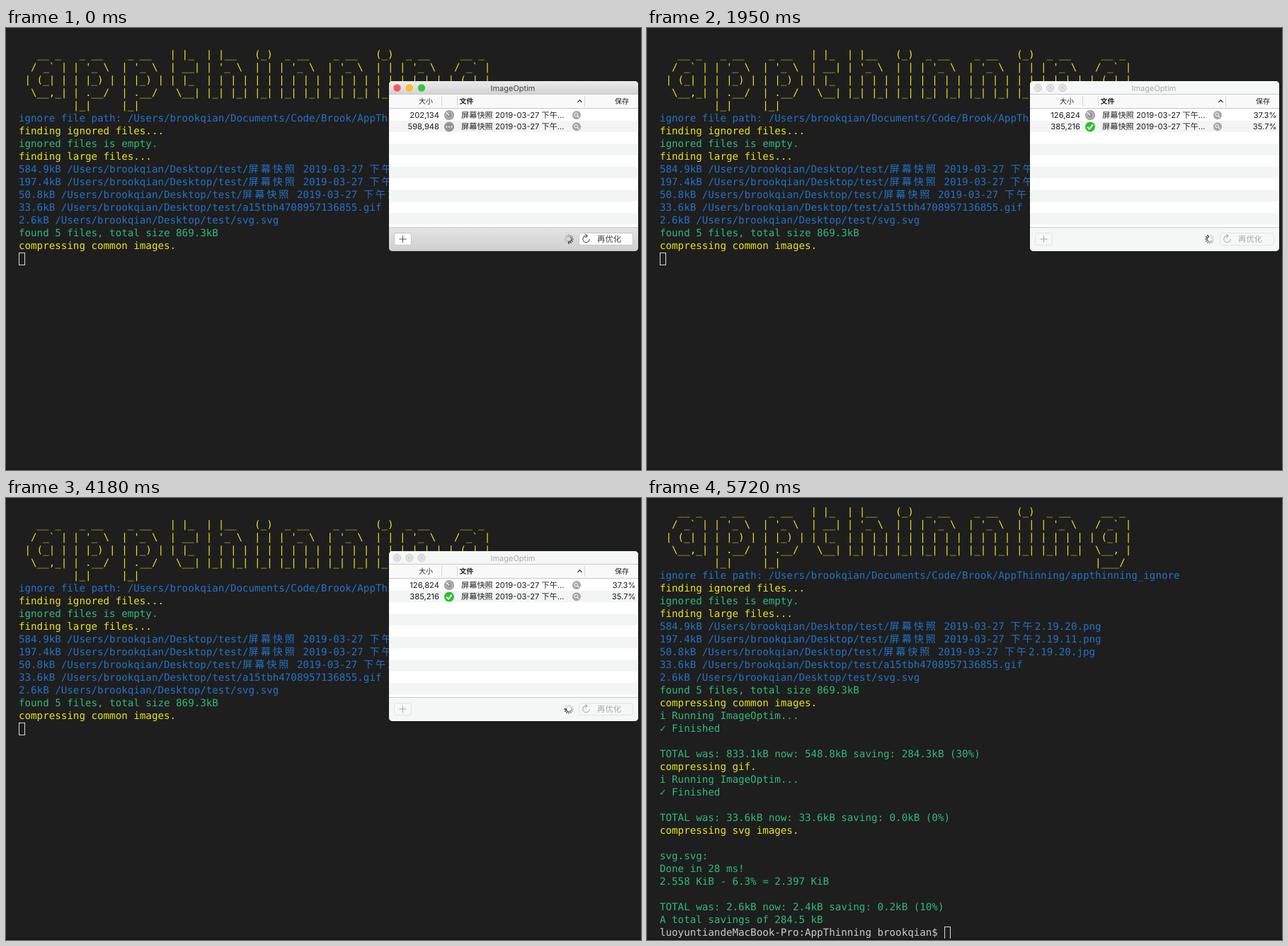
These frames come from a looping animation (897 px wide and 624 px high, 6890 ms). An HTML page:

```html
<!DOCTYPE html>
<html lang="en">
<head>
<meta charset="utf-8">
<title>appthinning</title>
<style>
html, body { margin: 0; width: 100%; height: 100%; overflow: hidden; background: #1e1e1e; }
body { position: relative; text-rendering: geometricPrecision; }
#term { position: absolute; left: 18px; top: 29px; font: 14.2px/18px "DejaVu Sans Mono", "Noto Sans CJK SC", monospace; }
#term div { height: 18px; white-space: pre; }
.y { color: #e5e521; } .g { color: #2fba7a; } .b { color: #2472c8; } .w { color: #ccc; }
.cjk { letter-spacing: 2.9px; }
#cursor { position: absolute; box-sizing: border-box; width: 9px; height: 18px; border: 1px solid #d8d8d8; }
#edge { position: absolute; left: 0; right: 0; top: 622px; height: 2px; background: #171717; }
svg { position: absolute; left: 0; top: 0; font: 11.2px Inter, "Noto Sans CJK SC", sans-serif; }
.r { text-anchor: end; } .m { text-anchor: middle; }
.bar { fill: url(#bar); } .foot { fill: url(#foot); }
.btn rect { fill: #fdfdfd; stroke: #c6c6c6; }
.btn path { fill: none; stroke: #555; }
.btn text, .title { fill: #444; }
.idle .bar, .idle .foot { fill: #f5f6f6; }
.idle .btn rect { fill: #f6f7f7; stroke: #e3e3e3; }
.idle .btn path { stroke: #aaa; }
.idle .btn text, .idle .title { fill: #aaa; }
.lights path, .idle .lights circle { stroke: #c2c2c2; }
.idle .lights circle { fill: #e4e4e4; }
.lights path, .saved, .done .todo { display: none; }
.idle .lights path { display: inline; }
.done .saved { display: inline; }
</style>
</head>
<body>
<div id="term"></div>
<div id="cursor"></div>
<div id="edge"></div>
<svg id="win" width="897" height="624" viewBox="0 0 897 624">
  <defs>
    <linearGradient id="bar" x2="0" y2="1"><stop stop-color="#ececec"/><stop offset="1" stop-color="#d4d4d4"/></linearGradient>
    <linearGradient id="foot" x2="0" y2="1"><stop stop-color="#e4e4e4"/><stop offset="1" stop-color="#cfcfcf"/></linearGradient>
    <clipPath id="frame"><rect x="541" y="75" width="352" height="240" rx="5"/></clipPath>
  </defs>
  <g clip-path="url(#frame)">
    <rect x="541" y="75" width="352" height="240" fill="#fff"/>
    <g id="stripes" fill="#f3f5f5"></g>
    <rect class="bar" x="541" y="75" width="352" height="18"/>
    <rect class="foot" x="541" y="281" width="352" height="34"/>
    <rect x="541" y="94" width="352" height="19" fill="#f9f9f9"/>
    <path d="M541 93.5h352M541 113.5h352M541 281.5h352" stroke="#c8c8c8"/>
    <path d="M615.5 96v15M637.5 96v15M817.5 96v15" stroke="#d6d6d6"/>
  </g>
  <g class="lights" stroke-width=".8">
    <circle cx="552.5" cy="84.5" r="5.2" fill="#fc5b57"/>
    <circle cx="569.8" cy="84.5" r="5.2" fill="#fdbc2e"/>
    <circle cx="587" cy="84.5" r="5.2" fill="#33c748"/>
    <path d="M550 82l5 5m0-5l-5 5M567.3 82l5 5m0-5l-5 5M584.5 82l5 5m0-5l-5 5"/>
  </g>
  <text class="title m" x="716" y="88.5" font-size="11">ImageOptim</text>
  <g fill="#222" font-size="10">
    <text class="r" x="603" y="107">大小</text>
    <text x="640.5" y="107" font-weight="700">文件</text>
    <text class="r" x="880" y="107">保存</text>
  </g>
  <path d="M807.5 105l3-3.4 3 3.4" fill="none" stroke="#333" stroke-width="1.2"/>
  <g id="rows" fill="#1c1c1c"></g>
  <g transform="translate(626 123)">
    <circle r="7" fill="#989898"/>
    <circle r="4.6" fill="none" stroke="#d8d8d8" stroke-width="2" stroke-dasharray="1 1.4"/>
    <path d="M0 0L-4.5-4" stroke="#fff" stroke-width="1.2"/>
  </g>
  <g class="todo" transform="translate(626 139.5)">
    <circle r="7" fill="#949494"/>
    <path d="M-3.6 0h.01M0 0h.01M3.6 0h.01" stroke="#fff" stroke-width="2.2" stroke-linecap="round"/>
  </g>
  <g class="saved" transform="translate(626 139.5)">
    <circle r="7" fill="#2cc02c"/>
    <path d="M-3.8 .2l2.8 3 4.8-6" fill="none" stroke="#fff" stroke-width="2"/>
  </g>
  <g class="btn">
    <rect x="548.5" y="289.5" width="24" height="17" rx="3"/>
    <path d="M555.5 298h10M560.5 293v10"/>
    <rect x="809.5" y="289.5" width="76" height="17" rx="3"/>
    <path d="M820.5 293.6a4.6 4.6 0 1 0 3.6 4.4M818.5 291.2l2.6 2.4-2.6 2.4" stroke-width="1.1"/>
    <text x="835" y="302.2" font-size="11.4">再优化</text>
  </g>
  <g id="spin" transform="translate(795 298)" stroke="#222" stroke-width="1.4" stroke-linecap="round"></g>
</svg>
<script>
const $ = id => document.getElementById(id);
const LOOP = 6890, TICK = 66, CELL = 8.549, LINE = 18;
const user = 'brookqian', dir = `/Users/${user}/Desktop/test/`;

// Banner letters, five rows each
const glyphs = {
  a: ['   __ _ ', '  / _` |', ' | (_| |', '  \\__,_|', '        '],
  p: ['  _ __  ', " | '_ \\ ", ' | |_) |', ' | .__/ ', ' |_|    '],
  t: [' | |_ ', ' | __|', ' | |_ ', '  \\__|', '      '],
  h: [' | |__  ', " | '_ \\ ", ' | | | |', ' |_| |_|', '        '],
  i: [' (_)', ' | |', ' | |', ' |_|', '    '],
  n: ['  _ __  ', " | '_ \\ ", ' | | | |', ' |_| |_|', '        '],
  g: ['   __ _ ', '  / _` |', ' | (_| |', '  \\__, |', '  |___/ ']
};
const banner = [0, 1, 2, 3, 4].map(r => 'y' + [...'appthinning'].map(c => glyphs[c][r]).join(''));
const optim = ['gi Running ImageOptim...', 'g✓ Finished', 'g'];

// First character of each line is its colour class
const lines = [
  ...banner,
  `bignore file path: /Users/${user}/Documents/Code/Brook/AppThinning/appthinning_ignore`,
  'yfinding ignored files...',
  'gignored files is empty.',
  'yfinding large files...',
  `b584.9kB ${dir}屏幕快照 2019-03-27 下午2.19.20.png`,
  `b197.4kB ${dir}屏幕快照 2019-03-27 下午2.19.11.png`,
  `b50.8kB ${dir}屏幕快照 2019-03-27 下午2.19.20.jpg`,
  `b33.6kB ${dir}a15tbh4708957136855.gif`,
  `b2.6kB ${dir}svg.svg`,
  'gfound 5 files, total size 869.3kB',
  'ycompressing common images.',
  ...optim,
  'gTOTAL was: 833.1kB now: 548.8kB saving: 284.3kB (30%)',
  'ycompressing gif.',
  ...optim,
  'gTOTAL was: 33.6kB now: 33.6kB saving: 0.0kB (0%)',
  'ycompressing svg images.',
  'g',
  'gsvg.svg:',
  'gDone in 28 ms!',
  'g2.558 KiB - 6.3% = 2.397 KiB',
  'g',
  'gTOTAL was: 2.6kB now: 2.4kB saving: 0.2kB (10%)',
  'gA total savings of 284.5 kB',
  `wluoyuntiandeMacBook-Pro:AppThinning ${user}$ `
];
$('term').innerHTML = lines.map(s =>
  `<div class="${s[0]}">${s.slice(1).replace(/[\u4e00-\u9fff]+/g, '<span class="cjk">$&</span>')}</div>`).join('');
const rows = [...$('term').children];

for (let i = 0; i < 5; i++)
  $('stripes').innerHTML += `<rect x="541" y="${130.8 + i * 32.6}" width="352" height="16.3"/>`;

const fileRow = (y, before, after, pct) => `
  <text class="r todo" x="612" y="${y + 4}">${before}</text>
  <text class="r saved" x="612" y="${y + 4}">${after}</text>
  <text x="643" y="${y + 4}">屏幕快照 2019-03-27 下午...</text>
  <circle cx="806" cy="${y}" r="6" fill="#a6a6a6"/>
  <circle cx="805.2" cy="${y - .8}" r="2.3" fill="none" stroke="#fff"/>
  <path d="M807 ${y + 1}l2.4 2.4" stroke="#fff" stroke-width="1.2"/>
  <text class="r saved" x="889.5" y="${y + 4}">${pct}</text>`;
$('rows').innerHTML = fileRow(123, '202,134', '126,824', '37.3%') + fileRow(139.3, '598,948', '385,216', '35.7%');

for (let i = 0; i < 12; i++)
  $('spin').innerHTML += `<path d="M0-3.4V-6.2" transform="rotate(${i * 30})"/>`;
const spokes = [...$('spin').children];

function draw(t) {
  const end = t >= 5720;
  const count = end ? lines.length : t >= 5010 ? 26 : t >= 4350 ? 21 : 16;
  rows.forEach((row, i) => row.style.visibility = i < count ? 'visible' : 'hidden');
  const top = end ? 29 - LINE : 29;
  $('term').style.top = top + 'px';
  $('cursor').style.left = 18 + (end ? (lines[count - 1].length - 1) * CELL : 0) + 'px';
  $('cursor').style.top = top + (end ? count - 1 : count) * LINE + 'px';

  $('win').style.display = t < 4230 ? 'block' : 'none';
  $('win').classList.toggle('idle', t >= 220);
  $('win').classList.toggle('done', t >= 420);
  const head = 6 + Math.floor(t / TICK);
  spokes.forEach((s, i) => s.style.opacity = Math.max(.15, 1 - (head - i + 120) % 12 / 9));
}

const start = performance.now();
function tick() {
  draw((performance.now() - start) % LOOP);
  requestAnimationFrame(tick);
}
draw(0);
requestAnimationFrame(tick);
</script>
</body>
</html>
```
